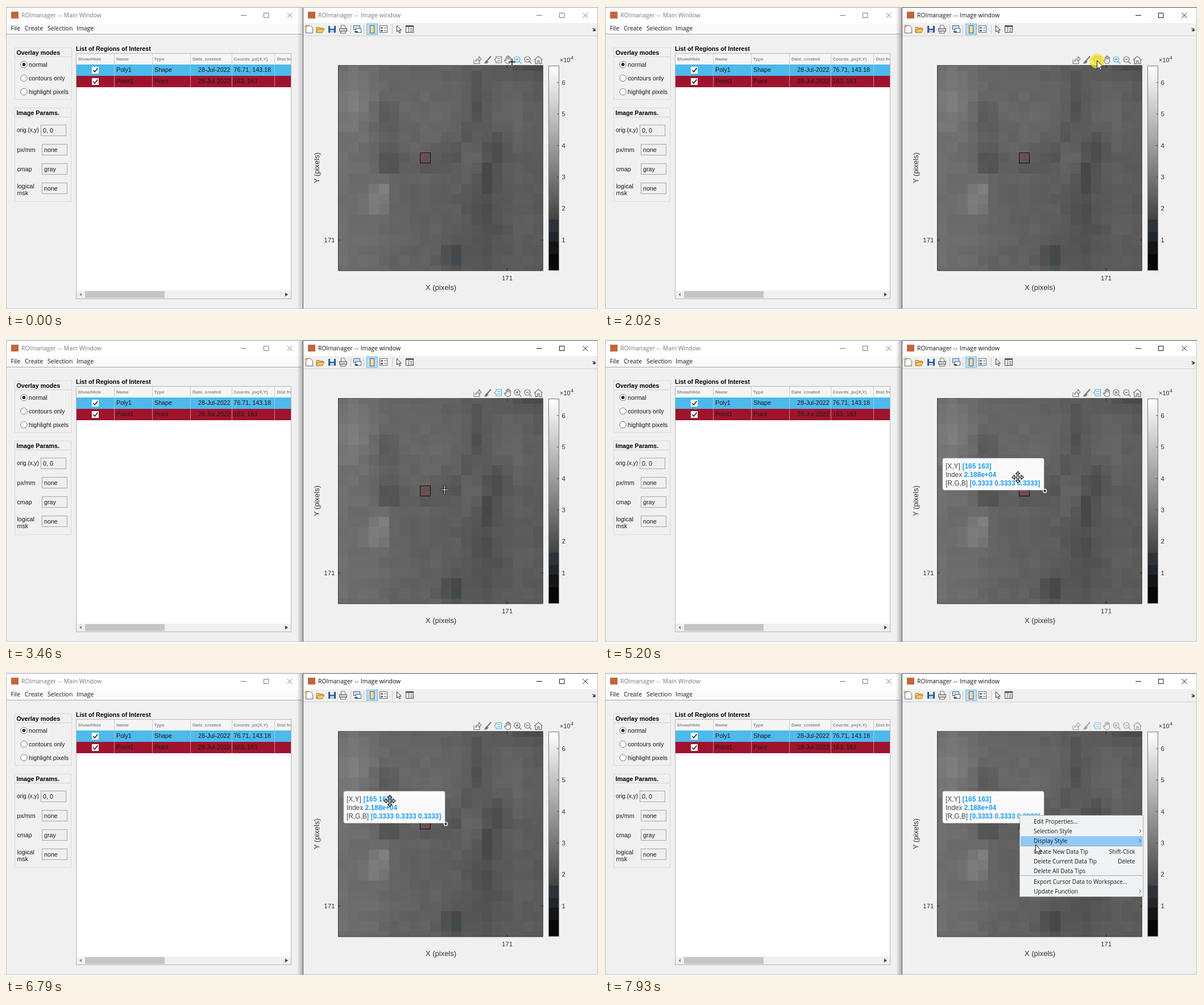
An HTML page that plays this animation: 1043 by 537 pixels, repeating every 8 s.

```html
<!DOCTYPE html>
<html lang="en">
<head>
<meta charset="utf-8">
<title>ROI manager data tip</title>
<style>
html, body { margin: 0; width: 100%; height: 100%; overflow: hidden; background: #f0f0f0; }
svg { display: block; width: 100vw; height: 100vh; }
text { white-space: pre; font-family: "Liberation Sans", Arial, sans-serif; }
.ui { font-family: "Open Sans", "Noto Sans", sans-serif; }
.crisp { shape-rendering: crispEdges; }
</style>
</head>
<body>
<svg id="stage" viewBox="0 0 1043 537" preserveAspectRatio="none"></svg>
<script>
const LOOP = 8000;
const CELL = 18.05, AX = 584, AY = 105, SIZE = 361;

const rect = (x, y, w, h, fill, extra = '') =>
  `<rect x="${x}" y="${y}" width="${w}" height="${h}" fill="${fill}" ${extra}/>`;
const frame = (x, y, w, h, stroke, fill = 'none', extra = '') =>
  rect(x + .5, y + .5, w - 1, h - 1, fill, `stroke="${stroke}" ${extra}`);
const path = (d, stroke, width = 1, fill = 'none', extra = '') =>
  `<path d="${d}" stroke="${stroke}" stroke-width="${width}" fill="${fill}" ${extra}/>`;
const text = (x, y, s, size = 10.7, fill = '#1a1a1a', extra = '') =>
  `<text x="${x}" y="${y}" font-size="${size}" fill="${fill}" ${extra}>${s}</text>`;
const ui = (x, y, s, size = 10.5, fill = '#1a1a1a', extra = '') =>
  text(x, y, s, size, fill, `class="ui" ${extra}`);
const group = (id, body, extra = '') => `<g id="${id}" ${extra}>${body}</g>`;
const gradient = (id, dir, stops) => `<linearGradient id="${id}" x1="0" y1="0" ${dir}>` +
  stops.map(([at, color, alpha = 1]) =>
    `<stop offset="${at}" stop-color="${color}" stop-opacity="${alpha}"/>`).join('') + '</linearGradient>';
const BOLD = 'font-weight="700"', END = 'text-anchor="end"', MID = 'text-anchor="middle"';
const gray = v => `rgb(${v},${v},${v})`;

function lerpKeys(keys, t) {
  const i = keys.findIndex(k => k[0] > t);
  if (i < 0) return keys[keys.length - 1].slice(1);
  if (i === 0) return keys[0].slice(1);
  const a = keys[i - 1], b = keys[i], p = (t - a[0]) / (b[0] - a[0]);
  return a.slice(1).map((v, n) => v + (b[n + 1] - v) * p);
}

// Window chrome shared by both windows
function titleBar(x, name, buttons) {
  const b = buttons;
  const spaced = name.replace('--', '<tspan letter-spacing="1">--</tspan>');
  return rect(x + 9, 10, 13, 12, '#c4643c') + ui(x + 27, 20, spaced, 10.4, 'currentColor') +
    path(`M${b} 16.5h10M${b + 40.5} 12.5h8.5v8h-8.5zM${b + 81.5} 12l9 9m0-9l-9 9`, 'currentColor', 1);
}

function panel(x, y, w, h, title) {
  return frame(x, y, w, h, '#d9d9d9') + rect(x + 1, y + 16, w - 2, 1, '#d0d0d0') +
    text(x + 3.5, y + 12.5, title, 10.7, '#000', BOLD);
}

function radio(y, label, on) {
  return `<circle cx="31.5" cy="${y}" r="5.7" fill="#fff" stroke="#777"/>` +
    (on ? `<circle cx="31.5" cy="${y}" r="3" fill="#333"/>` : '') + text(40, y + 4, label);
}

const field = (x, y, value) =>
  frame(x, y, 45, 20, '#a6a6a6', '#efefef') + text(x + 4, y + 14, value);

function tableRow(y, fill, name, type, coords) {
  return rect(124, y, 378, 20, fill) +
    rect(151, y + 4, 12, 12, '#fff') + path(`M153.5 ${y + 10}l2.7 3 5-6.5`, '#222', 1.7) +
    text(194, y + 13, name) + text(261, y + 13, type) +
    text(394.5, y + 13, '28-Jul-2022', 10.7, '#1a1a1a', END) + text(400.5, y + 13, coords);
}

function mainWindow() {
  const heads = [[126.5, 'Show/Hide'], [194, 'Name'], [260.5, 'Type'],
    [328, 'Date_created'], [400.5, 'Coords_px(X,Y)'], [476.5, 'Dist from']];
  const lines = [190, 257, 324, 397, 472].map(x =>
    rect(x, 84, 1, 19, '#cfcfcf') + rect(x, 103, 1, 40, '#d8d8d8', 'opacity=".6"')).join('');
  return rect(0, 0, 521, 533, '#f0f0f0') + rect(1, 3, 519, 47, '#fff') +
    rect(1, 31, 519, 18, '#fafafa') + rect(1, 49, 519, 1, '#aaa') +
    `<g color="#777">${titleBar(0, 'ROImanager -- Main Window', 413)}</g>` +
    ui(8.5, 43, 'File') + ui(33, 43, 'Create') + ui(73, 43, 'Selection') + ui(124, 43, 'Image') +
    panel(15, 73, 101, 92, 'Overlay modes') +
    radio(103, 'normal', true) + radio(127, 'contours only') + radio(151, 'highlight pixels') +
    panel(15, 179, 100, 166, 'Image Params.') +
    text(19, 222, 'orig.(x,y)', 10) + text(19.5, 257, 'px/mm') + text(19.5, 291, 'cmap') +
    text(19.5, 321, 'logical') + text(19.5, 333, 'msk') +
    field(61, 209, '0, 0') + field(63, 243, 'none') + field(63, 277, 'gray') + field(63, 311, 'none') +
    text(123, 79, 'List of Regions of Interest', 10.7, '#000', BOLD) +
    rect(123, 83, 379, 433, '#fff') + rect(124, 84, 378, 19, '#f5f5f5') +
    `<clipPath id="table"><rect x="123" y="83" width="378" height="433"/></clipPath>` +
    `<g clip-path="url(#table)">` +
    heads.map(([x, s]) => text(x, 96, s, 8, '#8a8a8a', BOLD)).join('') +
    tableRow(103, '#4db9ec', 'Poly1', 'Shape', '76.71, 143.18') +
    tableRow(123, '#a0132d', 'Point1', 'Point', '163, 163') + lines +
    rect(124, 501, 378, 14, '#f0f0f0') + rect(139, 502, 140, 12, '#c5c5c5') +
    path('M133 505l-4 3 4 3z', 'none', 0, '#888') + path('M491 504.5l5 3.5-5 3.5z', 'none', 0, '#444') +
    `</g>` + frame(123, 83, 379, 433, '#b5b5b5') + rect(0, 2, 521, 1, '#aaa') +
    rect(0, 3, 1, 530, '#bbb') + rect(0, 532, 521, 1, '#ccc') +
    gradient('shade', 'x2="1" y2="0"', [[0, '#000', 0], [1, '#000', .28]]) +
    group('shadow', rect(512, 3, 10, 530, 'url(#shade)'));
}

// Pixel mosaic: column tone, fixed noise, and soft spots [col, row, width, height, change]
const tone = [[0, 110], [3, 106], [5, 99], [9, 97], [11, 94], [14, 90], [17, 94], [20, 88]];
const spots = [
  [1, 3.5, 1.3, 2, 17], [4, 5.5, .7, 1.6, -13], [4.5, 9.5, .9, .8, -21], [8, 10, .6, .5, -11],
  [10.5, 9, .9, .8, -12], [9, 4, 2.5, 2.5, 6], [13, 4.3, .6, 1.2, -14], [12, 6.5, .6, .8, -10],
  [18.2, 0, 1.4, .8, -18], [13, 1.3, .6, .7, -8], [16, 4.5, 2, 1.8, 8], [15, 8, .8, 1.2, -16],
  [14, 10.8, .7, 1, -18], [12.5, 9, .7, 1.5, 10], [14, 15.5, 1.3, 3, -12], [10.5, 18.3, .8, .9, -22],
  [11.2, 19.2, .5, .7, -16], [4, 12, .5, .6, 22], [3.4, 13.4, .7, .9, 22]
];
function mosaic() {
  let out = '';
  for (let r = 0; r < 21; r++) for (let c = 0; c < 20; c++) {
    const n = Math.sin(c * 12.9898 + r * 78.233) * 43758.5453;
    let v = lerpKeys(tone, c)[0] + (n - Math.floor(n) - .5) * 7;
    for (const [x, y, w, h, change] of spots)
      v += change * Math.exp(-(((c - x) / w) ** 2 + ((r - y) / h) ** 2) / 2);
    const fill = c === 11 && r === 19 ? '#42494c' : gray(Math.round(v));
    out += rect(AX + c * CELL, AY + (r - .5) * CELL, CELL + .3, CELL + .3, fill);
  }
  return `<clipPath id="axes"><rect x="${AX}" y="${AY}" width="${SIZE}" height="${SIZE}"/></clipPath>` +
    `<g clip-path="url(#axes)"><g class="crisp">${out}</g></g>`;
}

function colorbar() {
  let out = gradient('ramp', 'x2="0" y2="1"', [[0, '#fff'], [.76, '#404040'], [1, '#000']]) +
    rect(954, AY, 19, SIZE, 'url(#ramp)') + rect(954, 376, 19, 22, '#2d333c') +
    rect(954, 398, 19, 17, '#22262a') + rect(954, 415, 19, 22, '#141516') + rect(954, 437, 19, 29, '#070707');
  for (let n = 1; n < 7; n++) {
    const y = 467.2 - n * 55.4;
    out += path(`M969 ${y}h4`, '#333', .8) + text(977.5, y + 4, n, 11.5, '#333');
  }
  return out + frame(954, 105, 19, 361, '#777') +
    text(974, 99, '×10', 11, '#333') + text(993, 94, '4', 9, '#333');
}

function toolbar() {
  const sheet = path('M527.5 34.5h8l4 4v9h-12z', '#667', 1, '#fff') +
    path('M528 33v6m-3-3h6', '#e8a33a', 1.4);
  const folder = path('M546 46.5v-9h5l1 1.5h6v2', '#a8731c', 1, '#f3cf83') +
    path('M546 47l3-6.5h10.5l-3 6.5z', '#a8731c', 1, '#f8c95f');
  const disk = rect(567, 35, 13, 12, '#2c5b8d') + rect(570, 35, 7, 5, '#e8eef5') + rect(570, 42, 7, 5, '#b9cde0');
  const printer = path('M589.5 40v-6h6l2 6', '#666', 1, '#fff') + frame(586, 39, 14, 6, '#666', '#ccc') +
    path('M589 45l-1 3h9l1-3', '#666', 1, '#eee');
  const link = frame(611, 34, 12, 8, '#47688c', '#cfe0f1') + frame(615, 39, 10, 8, '#47688c', '#fff') +
    path('M613 45.5h6', '#333', 1.8);
  const bar = rect(634, 31, 20, 20, '#b7dcf5') + frame(634, 31, 20, 20, '#7ab8e2') +
    frame(640, 34, 8, 14, '#4d5b69', '#f7d99a');
  const legend = frame(657, 34, 14, 13, '#526b83', '#fff') + rect(659, 37, 4, 3, '#d45b3c') +
    rect(659, 42, 4, 3, '#3978b4') + path('M665 38.5h4m-4 5h4', '#555');
  const pointer = path('M687.5 34.5v11l2.5-2.3 2 4.3 1.8-.8-2-4.2h3.5z', '#333', 1, '#fff');
  const inspector = frame(703, 34, 14, 13, '#444', '#fff') + rect(704, 35, 12, 2, '#567') +
    path('M708.5 37v10M711 39.5h4m-4 2.5h4m-4 2.5h4', '#555');
  const seps = [606, 629, 679].map(x => rect(x, 33, 1, 16, '#c8c8c8')).join('');
  return sheet + folder + disk + printer + link + bar + legend + pointer + inspector + seps +
    path('M1032 39l4 4m0-3.5v4h-4', '#222', 1.3);
}

function axesTools() {
  const c = 'currentColor', lens = x =>
    `<circle cx="${x - 1}" cy="94" r="5" fill="none" stroke="${c}" stroke-width="1.2"/>` +
    path(`M${x + 2.5} 97.5l4 4M${x - 3.5} 94h5`, c, 1.3);
  return path('M823 94v7.5h10v-4M826 98c0-4 3-6 6-6v-3l4 4.5-4 4v-3c-3 0-5 1-6 3.5z', c, 1.1) +
    path('M853 88.5l-6.5 7.5', c, 2.2) + path('M846 95.5c-3 0-2 4-5 5 3 1.5 7 0 7-3z', c, .8, c) +
    group('tip-tool', path('M862 89h9.5v11h-9.5v-3l-3-2.5 3-2.5zM864 92.5h5.5m-5.5 4h5.5', c, 1.2)) +
    path('M879.5 96v-5c0-1.5 2-1.5 2 0v3-5c0-1.5 2-1.5 2 0v5-4.5c0-1.5 2-1.5 2 0v5-3c0-1.5 2-1.5 2 0v5c0 3-2 5-4 5h-1.5c-2 0-4-3-5.5-5.5 0-1.5 1.5-1.5 3 0z', c, 1.1) +
    group('zoom-tool', lens(900) + path('M899 91.5v5', c, 1.3)) + lens(918) +
    path('M929 95l7.5-6.5 7 6.5M931 94v7.5h4v-5h3v5h4v-7.5', c, 1.3);
}

function imageWindow() {
  const label = (x, y, s, extra) => text(x, y, s, 13, '#333', `${MID} ${extra || ''}`);
  return rect(522, 2, 519, 531, '#f0f0f0') + rect(523, 3, 517, 27, '#fff') +
    rect(523, 52, 517, 1, '#d0d0d0') +
    group('title', titleBar(522, 'ROImanager -- Image window', 933)) + toolbar() +
    frame(522, 2, 519, 531, '#c4c4c4') + group('edge', rect(522, 2, 519, 1, 'currentColor')) +
    rect(522, 3, 1, 530, '#555') +
    mosaic() + path('M584.5 105v361h360', '#333') + path('M584 104.5h360.5v361', '#555') +
    path('M584 412h4m353 0h4M881.5 466v-4m0-353v-4', '#222') +
    frame(728, 258, 19, 19, '#111', '#694f51') +
    text(578.5, 416, '171', 11.5, '#333', END) + text(881.5, 483, '171', 11.5, '#333', MID) +
    label(765, 500, 'X (pixels)') + label(551, 285, 'Y (pixels)', 'transform="rotate(-90 551 285)"') +
    colorbar() + group('tools', axesTools(), 'color="#777"');
}

function dataTip() {
  const line = (y, key, x, value) =>
    text(599, y, key, 11.9, '#444') + text(x, y, value, 11.9, '#1b9bf0', BOLD);
  return rect(594, 210, 178, 56, '#fafafd', 'rx="3" stroke="#d5d5d5" stroke-width=".6"') +
    line(228, '[X,Y]', 628.5, '[165 163]') + line(243, 'Index', 631.5, '2.188e+04') +
    line(258, '[R,G,B]', 641.5, '[0.3333 0.3333 0.3333]') +
    '<circle cx="773.5" cy="267.5" r="3" fill="#333" stroke="#fff" stroke-width="1.4"/>';
}

const menuItems = [
  [263, 'Edit Properties...'], [280, 'Selection Style', '>'], [297, 'Display Style', '>'],
  [316, 'Create New Data Tip', 'Shift-Click'], [333, 'Delete Current Data Tip', 'Delete'],
  [350, 'Delete All Data Tips'], [369, 'Export Cursor Data to Workspace...'], [386, 'Update Function', '>']
];
function contextMenu() {
  const items = menuItems.map(([y, s, side]) => ui(754, y + 4, s, 10.1) +
    (side === '>' ? path(`M939.5 ${y - 3}l3 3-3 3`, '#444')
      : side ? ui(932.5, y + 4, side, 10.1, '#1a1a1a', END) : '')).join('');
  return frame(729, 252, 218, 144, '#b0b0b0', '#f1f2f3') +
    rect(731, 306, 214, 1, '#a8a8a8') + rect(731, 358, 214, 1, '#a8a8a8') +
    `<rect id="hover" x="731" width="214" height="17" fill="#91c9f7"/>` + items;
}

function cursors() {
  const arms = [0, 90, 180, 270].map(a =>
    `<path d="M-1-3v-3h-2.5l3.5-4 3.5 4h-2.5v3z" transform="rotate(${a})"/>`).join('');
  return group('arrow', path('M0 0v14.5l3.3-3 2.5 5.5 2.4-1-2.5-5.3h4.6z', '#111', 1, '#fff')) +
    group('plus', path('M-6 0h12M0-6v12', '#eee', 3) + path('M-6 0h12M0-6v12', '#000', 1.4)) +
    group('cross', path('M-8 0h16M0-8v16', '#111', 3) + path('M-7.5 0h15M0-7.5v15', '#fff', 1)) +
    group('move', `<g fill="#fff" stroke="#111" stroke-width="1.2">${arms}</g>` +
      path('M-5 0h10M0-5v10', '#111', 3.4) + path('M-6 0h12M0-6v12', '#fff', 1.2));
}

const stage = document.getElementById('stage');
stage.innerHTML = rect(0, 0, 1043, 537, '#f6f6f6') + mainWindow() + imageWindow() +
  group('tip', dataTip()) + group('menu', contextMenu()) +
  '<circle id="click" r="13" fill="#f5e21c" opacity=".72"/>' + group('cursor', cursors());

const el = id => document.getElementById(id);
const show = (id, on) => el(id).setAttribute('display', on ? 'inline' : 'none');
const within = (t, a, b) => t >= a && t < b;

const track = [
  [0, 890, 98.5], [70, 894, 98], [200, 914, 97], [470, 896, 94], [730, 896, 94],
  [800, 884, 94], [1550, 884, 94], [1620, 865.5, 96], [2090, 865.5, 96], [2650, 787, 266],
  [2720, 783, 266], [2860, 762, 266], [3060, 762, 266], [3130, 771.5, 265.5], [5199, 771.5, 265.5],
  [5200, 726.5, 243.5], [5480, 631, 221], [5680, 631, 221], [5900, 672, 224], [6130, 670, 238],
  [6380, 639, 227], [6510, 641, 227], [6790, 675, 227], [6920, 675, 227], [7060, 786, 264],
  [7260, 729.5, 253], [7660, 729.5, 253], [7930, 757.5, 304]
];

function cursorKind(t, x, y) {
  if (t < 70) return 'plus';
  if (t >= 7340 || y < 105) return 'arrow';
  return t >= 5200 && x < 772 ? 'move' : 'cross';
}

function draw(t) {
  const [x, y] = lerpKeys(track, t);
  const kind = cursorKind(t, x, y);
  for (const id of ['arrow', 'plus', 'cross', 'move']) show(id, id === kind);
  el('cursor').setAttribute('transform', `translate(${x} ${y})`);

  show('click', within(t, 1880, 2090) || within(t, 3390, 3460) || within(t, 7340, 7410));
  el('click').setAttribute('cx', x);
  el('click').setAttribute('cy', y + 1);

  const active = t >= 1880, picking = t >= 2090;
  el('title').setAttribute('color', active ? '#111' : '#777');
  el('edge').setAttribute('color', active ? '#555' : '#aaa');
  el('shadow').setAttribute('opacity', active ? 1 : .6);
  el('zoom-tool').setAttribute('color', picking ? '#777' : '#58b0df');
  el('tip-tool').setAttribute('color', picking ? '#58b0df' : '#777');
  el('tools').setAttribute('opacity', lerpKeys([[7340, 1], [7600, .65]], t)[0]);

  show('tip', t >= 4140);
  show('menu', t >= 7410);
  const row = menuItems.slice(0, 3).find(([cy]) => y - 1 >= cy - 8 && y - 1 < cy + 9);
  show('hover', t > 7670 && row);
  if (row) el('hover').setAttribute('y', row[0] - 8);
}

function tick() {
  draw(performance.now() % LOOP);
  requestAnimationFrame(tick);
}
tick();
</script>
</body>
</html>
```
